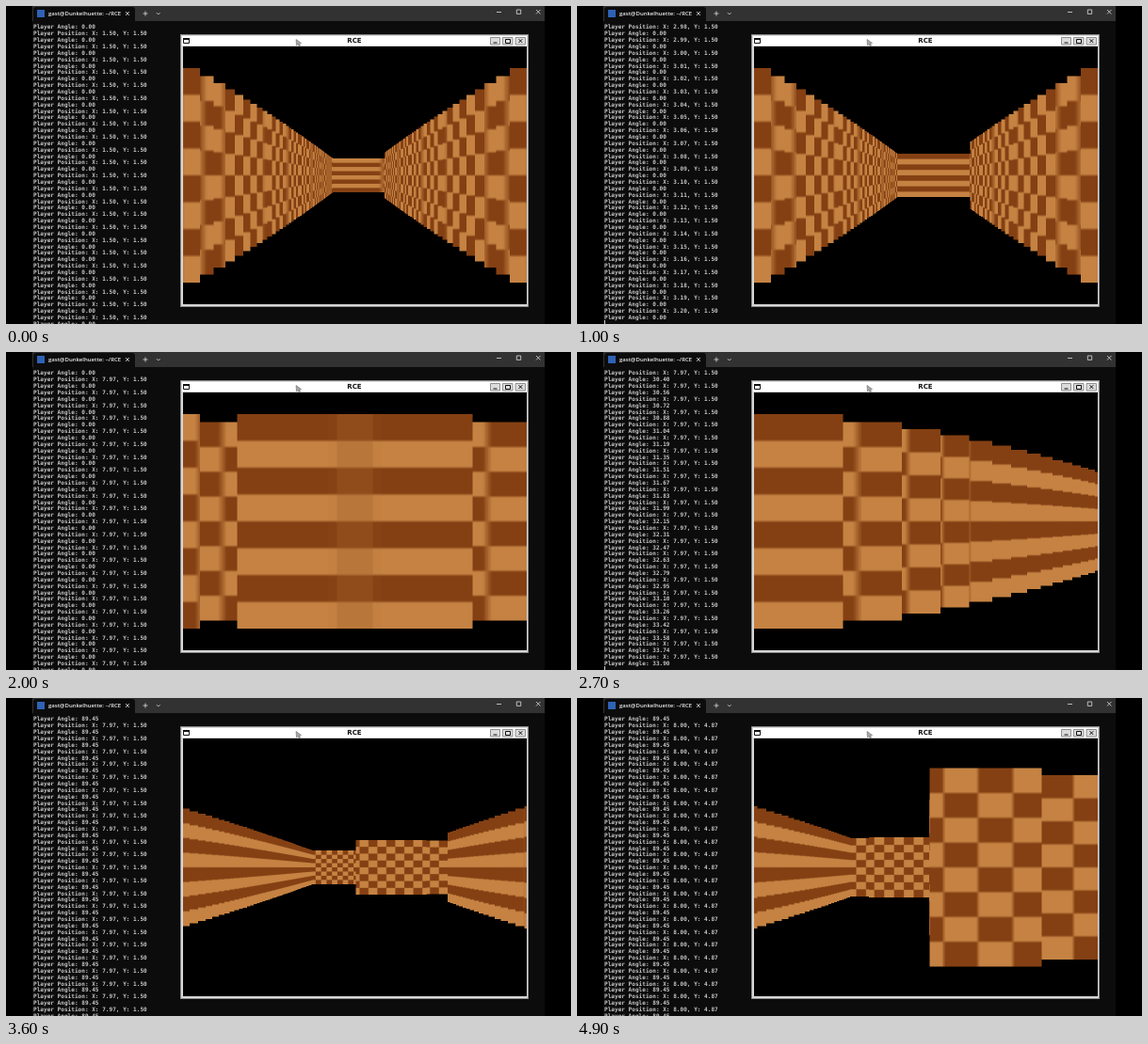
These frames come from a looping animation (600 by 338 pixels, 5 s). An HTML page with a canvas:

```html
<!DOCTYPE html>
<html lang="en">
<head>
<meta charset="utf-8">
<title>RCE</title>
<style>
html, body { margin: 0; width: 100%; height: 100%; overflow: hidden; background: #000; }
#stage { position: relative; width: 600px; height: 338px; overflow: hidden; background: #000; }
#stage > * { position: absolute; }
#term { left: 28px; top: 0; width: 544px; height: 338px; background: #0c0c0c; }
#bar { left: 28px; top: 0; width: 544px; height: 16px; background: #323232; }
#tab { left: 29px; top: 1px; width: 108px; height: 15px; border-radius: 3px 3px 0 0; background: #0c0c0c; }
#badge { left: 33px; top: 4px; width: 8px; height: 8px; background: #2f62b5; }
#host { left: 45px; top: 3px; font: 600 6px/10px "Open Sans", "Noto Sans", sans-serif; color: #eee; white-space: pre; }
#log { left: 29px; top: 19.4px; margin: 0; font: bold 6.08px/6.855px "DejaVu Sans Mono", monospace; color: #c6c6c6; }
#caret { left: 29px; top: 334px; width: 1px; height: 4px; background: #ccc; }
#frame { left: 185px; top: 30px; width: 368px; height: 288px; border: 1px solid #8a8a8a; background: #d6d6d6; }
#title { left: 187px; top: 32px; width: 366px; height: 10px; background: #fff; text-align: center;
  font: bold 7px/10px "DejaVu Sans", "Liberation Sans", sans-serif; color: #111; }
#view { left: 188px; top: 43px; width: 365px; height: 274px; background: #000; }
#icons { left: 0; top: 0; }
</style>
</head>
<body>
<div id="stage">
  <div id="term"></div>
  <div id="bar"></div>
  <div id="tab"></div>
  <div id="badge"></div>
  <div id="host">gast@Dunkelhuette: ~/RCE</div>
  <pre id="log"></pre>
  <div id="caret"></div>
  <div id="frame"></div>
  <div id="title">RCE</div>
  <canvas id="view" width="730" height="548"></canvas>
  <svg id="icons" width="600" height="338" fill="none">
    <g stroke="#ddd" stroke-width=".8">
      <path d="M127 6l4 4m0-4l-4 4M145.500 8h5m-2.500-2.500v5M160 7.200l1.800 1.800l1.800-1.800"/>
      <path d="M521 6.500h5M542.300 4h4.400v4.400h-4.400zM563 4l4.500 4.500m0-4.500l-4.500 4.500"/>
    </g>
    <path d="M188.500 34.500h6v5h-6z" stroke="#111"/>
    <path d="M188 35h7" stroke="#111" stroke-width="2"/>
    <g fill="#dcdcdc" stroke="#777" stroke-width=".8">
      <path d="M514.500 33.500h10v7.500h-10zM527.500 33.500h10.500v7.500h-10.500zM541 33.500h10.500v7.500h-10.500z"/>
    </g>
    <g stroke="#111">
      <path d="M517.500 39h4M530.500 35.500h5v4h-5zM544.500 35.200l3.800 3.800m0-3.800l-3.800 3.800"/>
    </g>
    <path d="M308 35.500l5.500 4l-2.200.5l1.200 2l-1.300.6l-1.200-2.100l-1.500 1.300z" fill="#aaa" stroke="#555" stroke-width=".5"/>
  </svg>
</div>
<script>
const LOOP = 5000, STEP = 100, TICK = 1.938;
const ROWS = 47;
const FOV = 60, MARCH = 0.1;
const DARK = [132, 64, 19], LIGHT = [197, 130, 66];
const MAP = [
  '##########',
  '#........#',
  '#######..#',
  '#######..#',
  '#######..#',
  '#........#',
  '########.#',
  '########.#',
  '########.#',
  '##########'
];

const view = document.getElementById('view');
const log = document.getElementById('log');
const caret = document.getElementById('caret');
const ctx = view.getContext('2d');
const W = view.width, H = view.height;
const img = ctx.createImageData(W, H);
const px = img.data;

const clamp = (v, lo, hi) => Math.min(hi, Math.max(lo, v));
const mix = (a, b, k) => a + (b - a) * k;

// Walk along the corridor, turn right, walk down the hall
function player(t) {
  const walk = clamp((t - 4000) / 663, 0, 1);
  return {
    x: clamp(3.2 + (t - 1000) / TICK * 0.01, 1.5, 7.97) + 0.032 * walk,
    y: 1.5 + 3.37 * walk,
    angle: clamp(33.89965 + (t - 2700) / TICK * 0.1591, 0, 89.45)
  };
}

// How far the picture runs ahead of the printed log, in ms
function lead(t) {
  return t < 1500 ? mix(10, 2, clamp((t - 1000) / 500, 0, 1))
                  : mix(2, 14, clamp((t - 1500) / 1200, 0, 1));
}

// Soft square wave, one cell per unit
function wave(a) {
  const k = Math.floor(a), f = a - k;
  return (k % 2 ? -1 : 1) * Math.min(1, Math.min(f, 1 - f) / 0.052);
}

function cast(p, angle) {
  const dx = Math.cos(angle) * MARCH, dy = Math.sin(angle) * MARCH;
  let n = 0, x, y;
  do {
    n++;
    x = p.x + dx * n;
    y = p.y + dy * n;
  } while (n < 160 && MAP[Math.floor(y)][Math.floor(x)] === '.');
  return { x, dist: (n + 1) * MARCH };
}

function drawView(p) {
  px.fill(0);
  for (let i = 3; i < px.length; i += 4) px[i] = 255;
  for (let c = 0; c < W; c++) {
    const deg = p.angle + FOV * ((c + 0.5) / W - 0.5);
    const hit = cast(p, deg * Math.PI / 180);
    const h = H / hit.dist, top = (H - h) / 2;
    const u = (Math.floor((hit.x % 1) * 512) + 0.5) / 512;
    const across = wave((u - 0.0735) * 8);
    const end = Math.min(H, Math.round(top + h));
    for (let r = Math.max(0, Math.round(top)); r < end; r++) {
      const v = clamp((r + 0.5 - top) / h, 0.01, 0.99);
      const k = (1 + across * wave(v * 8)) / 2;
      const i = (r * W + c) * 4;
      for (let j = 0; j < 3; j++) px[i + j] = mix(DARK[j], LIGHT[j], k);
    }
  }
  ctx.putImageData(img, 0, 0);
}

function drawLog(t) {
  const odd = (t >= 600 && t < 1200) || (t >= 2500 && t < 3000);
  const count = odd ? ROWS - 1 : ROWS;
  const lines = [];
  for (let i = 0; i < count; i++) {
    const isPos = i % 2 === (odd ? 0 : 1);
    const back = Math.floor((45 - i) / 2);
    const p = player(t - Math.max(0, back) * TICK);
    lines.push(isPos
      ? `Player Position: X: ${p.x.toFixed(2)}, Y: ${p.y.toFixed(2)}`
      : `Player Angle: ${p.angle.toFixed(2)}`);
  }
  log.textContent = lines.join('\n');
  caret.style.visibility = odd ? 'visible' : 'hidden';
}

let shown = -1;
const start = performance.now();
function tick() {
  const t = Math.floor((performance.now() - start) % LOOP / STEP) * STEP;
  if (t !== shown) {
    shown = t;
    drawView(player(t + lead(t)));
    drawLog(t);
  }
  requestAnimationFrame(tick);
}
tick();
</script>
</body>
</html>
```
